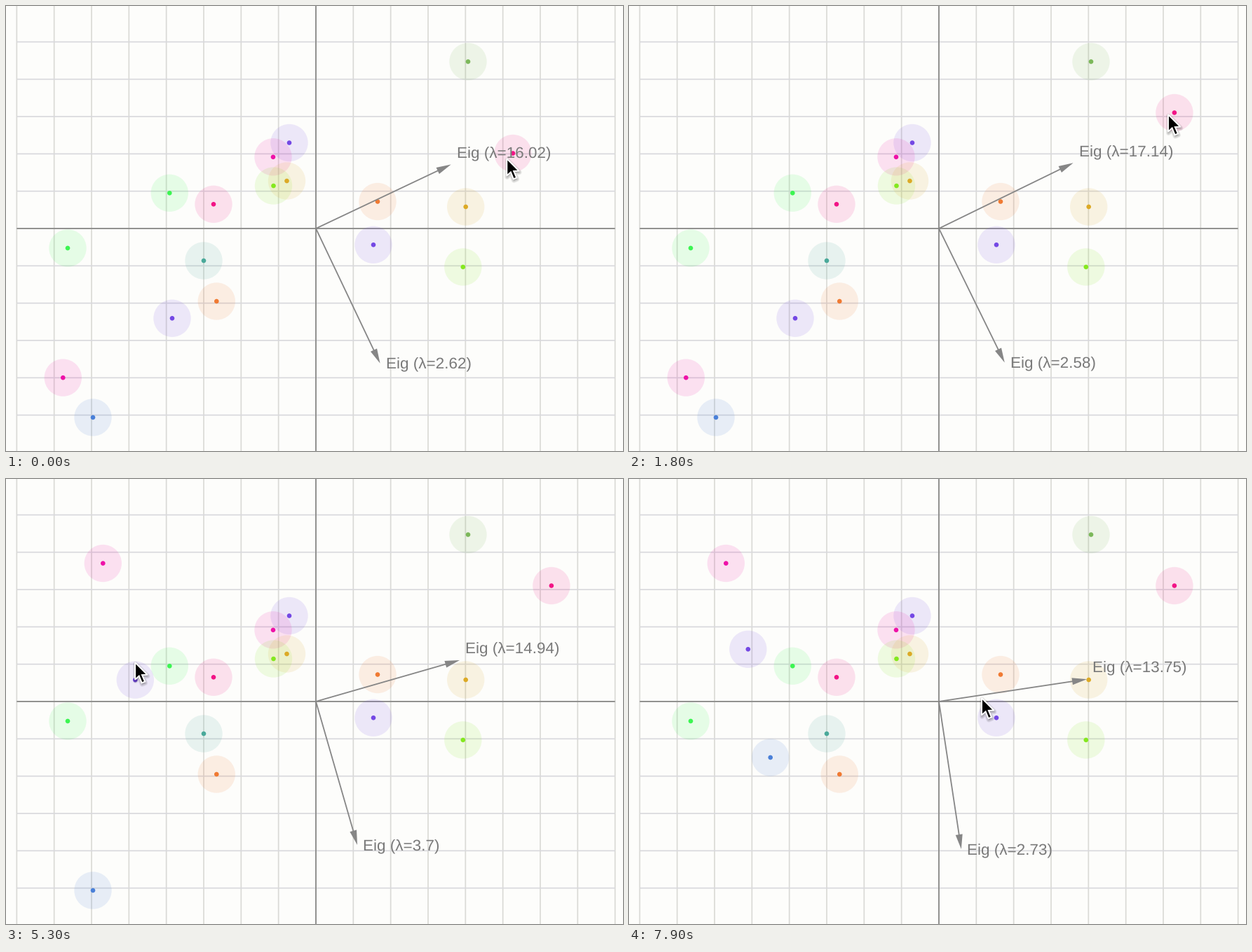
A matplotlib script for the animation above (8000 ms loop, 880x636 px).

```python
import numpy as np
import matplotlib.pyplot as plt
from matplotlib.animation import FuncAnimation
from matplotlib.collections import LineCollection
from matplotlib.patches import Circle, Polygon

W, H, DPI = 880, 636, 100
PT = 72 / DPI                      # points per pixel
UNIT = 160 / 3                     # pixels per grid step
ORIGIN = np.array([442.0, 318.0])
FRAMES, STEP_MS = 80, 100
LAG = 0.8                          # steps a dragged point trails the pointer

PINK, MAGENTA, VIOLET, BLUE = "#f21486", "#ee12a8", "#7448e4", "#4a80d8"
TEAL, OLIVE, LIME, MINT = "#4aa99a", "#7cb85a", "#84e81e", "#3cf552"
GOLD, ORANGE = "#dcaa26", "#f07a32"
GREY, INK = "#868686", "#7a7a7a"

plt.rcParams["font.family"] = "Liberation Sans"
plt.rcParams["text.hinting"] = "none"

# Resting data points, grouped by colour
RESTING = {
    OLIVE: [(659, 79.5)],
    VIOLET: [(404, 195.5), (524, 341.3)],
    MAGENTA: [(381, 215.8)],
    PINK: [(296, 283.3)],
    LIME: [(381.5, 257), (651.8, 373)],
    GOLD: [(400.5, 250), (655.7, 287)],
    MINT: [(233.3, 267.3), (88, 346)],
    TEAL: [(282, 364)],
    ORANGE: [(300.3, 422), (530, 279.5)],
}

# Drags in order: colour, pointer grip, (step, x, y) keys
DRAGS = [
    (PINK, (-9, 3), [(0, 723, 210.5), (7, 739.5, 358), (10, 780, 376),
                     (17, 777.9, 152.5)]),
    (MAGENTA, (0, 3), [(28, 81.3, 531.2), (31, 76, 475), (33, 85.4, 411.5),
                       (39, 100, 45), (41, 138.3, 120.5)]),
    (VIOLET, (0, 3), [(46, 237, 446.3), (56, 169.8, 243.3)]),
    (BLUE, (0, 3), [(64, 124, 588), (65, 127.5, 586), (66, 164, 566),
                    (70, 198, 440), (74, 201.7, 398)]),
]
HOVERS = [(19, 769, 155), (43, 249, 518), (79, 503, 313)]

# The pointer runs ahead of each drag and eases between them
CURSOR = sorted(HOVERS + [(t - LAG, x + gx, y + gy)
                          for _, (gx, gy), keys in DRAGS for t, x, y in keys])
ARROW_SHAPE = np.array([(0, 0), (0, 24.5), (5.6, 19.4), (9.6, 29.2),
                        (14, 27.4), (9.9, 17.9), (17.4, 17.6)])


def glide(keys, t):
    """Smooth path through (step, x, y) keys, at rest at ends and turns."""
    k = np.array(keys, float)
    times, pos = k[:, 0], k[:, 1:]
    t = np.clip(t, times[0], times[-1])
    slope = np.diff(pos, axis=0) / np.diff(times)[:, None]
    a, b = slope[:-1], slope[1:]
    same = a * b > 0
    tangent = np.zeros_like(pos)
    tangent[1:-1] = np.where(same, 2 * a * b / np.where(same, a + b, 1), 0)
    i = min(np.searchsorted(times, t, side="right") - 1, len(times) - 2)
    h = times[i + 1] - times[i]
    s = (t - times[i]) / h
    return ((1 + 2 * s) * (1 - s) ** 2 * pos[i] + s * (1 - s) ** 2 * h * tangent[i]
            + s * s * (3 - 2 * s) * pos[i + 1] + s * s * (s - 1) * h * tangent[i + 1])


def principal(points):
    """Eigenvalues (largest first) and angle of the main axis."""
    d = (points - ORIGIN) / UNIT * [1, -1]
    (sxx, sxy), (_, syy) = np.cov(d.T, bias=True)
    mid, half = (sxx + syy) / 2, (sxx - syy) / 2
    r = np.hypot(half, sxy)
    return (mid + r, mid - r), np.arctan2(sxy, half) / 2


fig = plt.figure(figsize=(W / DPI, H / DPI), dpi=DPI, facecolor="#fdfdfb")
ax = fig.add_axes([0, 0, 1, 1])
ax.set_xlim(0, W)
ax.set_ylim(H, 0)
ax.axis("off")


def add_lines(segments, color, z):
    ax.add_collection(LineCollection(segments, colors=color, linewidths=1.7 * PT,
                                     zorder=z, snap=False))


def vertical(i):
    x = ORIGIN[0] + i * UNIT
    return [(x, 0), (x, H)]


def horizontal(j):
    y = ORIGIN[1] + j * UNIT
    return [(ORIGIN[0] - 8 * UNIT, y), (ORIGIN[0] + 8 * UNIT, y)]


add_lines([vertical(i) for i in range(-8, 9)], "#dadad6", 1)
add_lines([horizontal(j) for j in range(-5, 6)], "#d9d9dd", 1)
add_lines([vertical(0), horizontal(0)], "#858583", 2)


def add_dot(x, y, color):
    halo = Circle((x, y), UNIT / 2, fc=color, ec="none", alpha=0.12, zorder=3)
    core = Circle((x, y), 3.3, fc=color, ec="none", zorder=4)
    return ax.add_patch(halo), ax.add_patch(core)


for color, spots in RESTING.items():
    for spot in spots:
        add_dot(*spot, color)
fixed = np.array([spot for spots in RESTING.values() for spot in spots])
movers = [add_dot(*keys[0][1:], color) for color, _, keys in DRAGS]


class Axis:
    """Arrow from the origin with an eigenvalue label at its tip."""

    def __init__(self, label_dy):
        self.dy = label_dy
        self.line, = ax.plot([], [], color=GREY, lw=1.8 * PT, zorder=5, snap=False)
        self.head = ax.add_patch(Polygon(np.zeros((3, 2)), fc=GREY, ec="none", zorder=5))
        self.label = ax.text(0, 0, "", color=INK, size=22.5 * PT, zorder=6,
                             ha="left", va="baseline")

    def point(self, angle, value):
        u = np.array([np.cos(angle), -np.sin(angle)])
        n = np.array([-u[1], u[0]])
        tip = ORIGIN + 4 * UNIT * u
        base = tip - 21 * u
        self.line.set_data(*np.transpose([ORIGIN, base + 4 * u]))
        self.head.set_xy([tip, base + 5 * n, base - 5 * n])
        self.label.set_position(tip + [8.3, self.dy])
        self.label.set_text(f"Eig (λ={round(float(value), 2):g})")


major, minor = Axis(-9.2), Axis(8.2)

shadows = [ax.add_patch(Polygon(ARROW_SHAPE, fc="black", ec="black", lw=w * PT,
                                alpha=0.07, joinstyle="round", zorder=8))
           for w in (3, 5, 7)]
pointer = ax.add_patch(Polygon(ARROW_SHAPE, fc="black", ec="white", lw=2 * PT,
                               joinstyle="miter", zorder=9))


def update(step):
    moved = np.array([glide(keys, step) for _, _, keys in DRAGS])
    for pair, p in zip(movers, moved):
        for circle in pair:
            circle.center = tuple(p)
    values, angle = principal(np.vstack([fixed, moved]))
    major.point(angle, values[0])
    minor.point(angle - np.pi / 2, values[1])
    tip = glide(CURSOR, step)
    pointer.set_xy(ARROW_SHAPE + tip)
    for s in shadows:
        s.set_xy(ARROW_SHAPE + tip + [0.5, 2])


anim = FuncAnimation(fig, update, frames=FRAMES, interval=STEP_MS,
                     init_func=lambda: update(0), repeat=True, repeat_delay=0)
plt.show()
```
